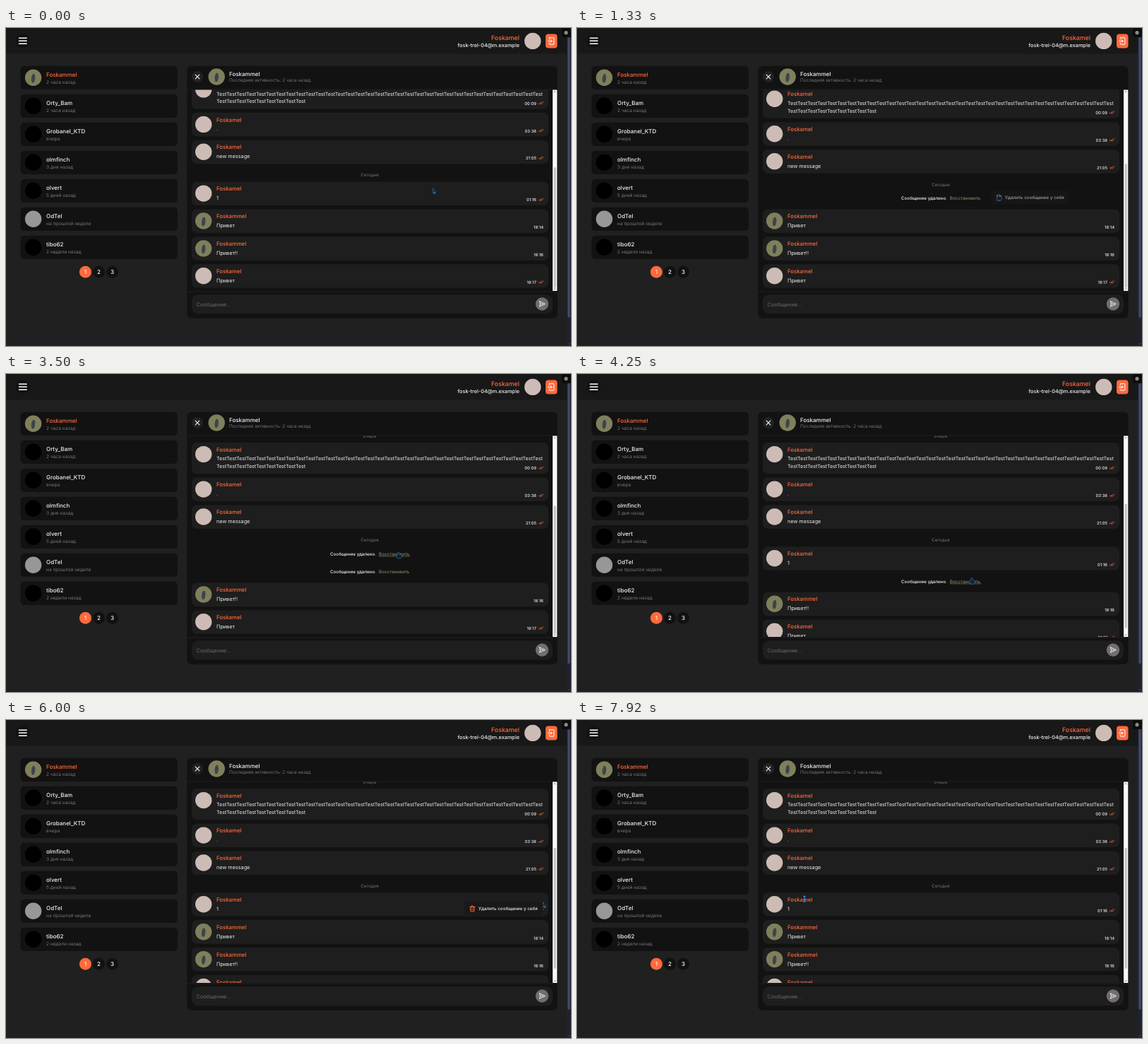
An HTML page with a canvas that plays this animation: 800x450 px, repeating every 8 s.

```html
<!DOCTYPE html>
<html lang="ru">
<head>
<meta charset="utf-8">
<style>
  html, body { margin: 0; width: 100%; height: 100%; overflow: hidden; background: #202021; }
  canvas { display: block; width: 800px; height: 450px; }
</style>
</head>
<body>
<canvas id="stage" width="800" height="450"></canvas>
<script>
const ctx = document.getElementById('stage').getContext('2d');
const LOOP = 8000, FPS = 12, TAU = Math.PI * 2;
const ORANGE = '#ff6a3d', WHITE = '#f2f2f2', GRAY = '#777', CARD = '#1e1e1e', DARK = '#121212';
const BLUE = '#3b8fdc', OLIVE = '#87856a';
const ME = 'Foskamel', FRIEND = 'Foskammel';
const CARD_H = 33.6, LINE_H = 10.6, GAP = 5.3, DATE_H = 19.9, SHRINK = 13.35;

const contacts = [
  [FRIEND, '2 часа назад', 'photo'], ['Orty_Bam', '2 часа назад'], ['Grobanel_KTD', 'вчера'],
  ['olmfinch', '3 дня назад'], ['olvert', '5 дней назад'], ['OdTel', 'на прошлой неделе', 'pale'],
  ['tibo62', '2 недели назад']
];

// `cut` and `back`: when a message is deleted and restored.
const thread = [
  { date: 'Вчера' },
  { mine: true, lines: ['Test'.repeat(33), 'Test'.repeat(9)], time: '00:09', size: 7.1 },
  { mine: true, lines: ['.'], time: '03:38' },
  { mine: true, lines: ['new message'], time: '21:05' },
  { date: 'Сегодня' },
  { mine: true, lines: ['1'], time: '01:16', cut: 1330, back: 3580 },
  { lines: ['Привет'], time: '18:14', cut: 2750, back: 4415 },
  { lines: ['Привет!!'], time: '18:16' },
  { mine: true, lines: ['Привет'], time: '18:17' }
];

// Places the pointer reaches; a stop with `close` opens a menu there.
const stops = [
  { at: 0, x: 604, y: 227 },
  { at: 420, x: 586, y: 231, close: 1290 },
  { at: 830, x: 597, y: 235 },
  { at: 2080, x: 600, y: 266, close: 2710 },
  { at: 2420, x: 610, y: 271 },
  { at: 3170, x: 556, y: 252 },
  { at: 4170, x: 559, y: 288 },
  { at: 5165, x: 713, y: 258 },
  { at: 5830, x: 760, y: 258, close: 6825 },
  { at: 6665, x: 765, y: 247 },
  { at: 7250, x: 766, y: 281 },
  { at: 7915, x: 322, y: 249 }
];
const TRAVEL = 500;
const menu = { w: 111, h: 19, delay: 100, fade: 120, maxX: 649 };

const clamp = v => Math.max(0, Math.min(1, v));
const isCut = (item, t) => t >= item.cut && t < item.back;

function box(x, y, w, h, r, color) {
  ctx.fillStyle = color;
  ctx.beginPath();
  ctx.roundRect(x, y, w, h, r);
  ctx.fill();
}

function frame(x, y, w, h, r, color, width) {
  ctx.strokeStyle = color;
  ctx.lineWidth = width;
  ctx.beginPath();
  ctx.roundRect(x, y, w, h, r);
  ctx.stroke();
}

function disc(x, y, r, color) {
  ctx.fillStyle = color;
  ctx.beginPath();
  ctx.arc(x, y, r, 0, TAU);
  ctx.fill();
}

function line(color, width, ...points) {
  ctx.strokeStyle = color;
  ctx.lineWidth = width;
  ctx.beginPath();
  points.forEach(([x, y]) => ctx.lineTo(x, y));
  ctx.stroke();
}

// A corner of two strokes around a tip, opening along (dx, dy).
function chevron(x, y, dx, dy, color, width) {
  line(color, width, [x + dx - dy, y + dy + dx], [x, y], [x + dx + dy, y + dy - dx]);
}

function text(s, x, cy, size, color = WHITE, weight = 400, align = 'left') {
  ctx.font = `${weight} ${size}px Inter, sans-serif`;
  ctx.textAlign = align;
  ctx.fillStyle = color;
  ctx.fillText(s, x, cy + size * 0.36);
}

function avatar(x, y, kind) {
  const colors = { anime: '#cdbcb5', pale: '#979797', photo: '#807f5c' };
  disc(x, y, 11.7, colors[kind] || '#000');
  if (kind !== 'photo') return;
  ctx.fillStyle = '#3e444b';
  ctx.beginPath();
  ctx.ellipse(x, y + 1, 2.7, 6.5, 0.1, 0, TAU);
  ctx.fill();
}

function ticks(x, y) {
  for (const shift of [0, 2.2]) {
    line(ORANGE, 0.75, [x + shift, y], [x + shift + 1.7, y + 1.6], [x + shift + 4.7, y - 1.8]);
  }
}

function heightOf(item, t) {
  if (item.date) return DATE_H;
  const full = CARD_H + (item.lines.length - 1) * LINE_H + GAP;
  return isCut(item, t) ? full - SHRINK : full;
}

// Every deletion moves the history above it down for good.
function layout(t) {
  const pending = thread.filter(item => item.cut > t).length;
  const shift = -SHRINK * pending;
  let top = 77.1 + shift;
  const rows = thread.map(item => {
    const row = { item, top, deleted: isCut(item, t) };
    top += heightOf(item, t);
    return row;
  });
  return { rows, shift };
}

function message({ mine, lines, time, size = 7.25 }, top) {
  const h = CARD_H + (lines.length - 1) * LINE_H;
  box(263, top, 505, h, 7, CARD);
  avatar(279.7, top + 16.6, mine ? 'anime' : 'photo');
  text(mine ? ME : FRIEND, 298, top + 9.9, 7.8, ORANGE, 500);
  lines.forEach((s, i) => text(s, 298, top + 22.9 + i * LINE_H, size));
  text(time, mine ? 751 : 761, top + h - 7.9, 5.8, WHITE, 500, 'right');
  if (mine) ticks(754, top + h - 8.2);
}

function overLink(row, p) {
  return row.deleted && p.x > 528 && p.x < 572 && Math.abs(p.y - row.top - 10.2) < 7;
}

function deletedRow(row, p) {
  const y = row.top + 10.2;
  text('Сообщение удалено.', 459, y, 6.25, WHITE, 500);
  text('Восстановить', 528, y, 6.3, OLIVE, 500);
  if (overLink(row, p)) line(OLIVE, 0.6, [528, y + 3.6], [572, y + 3.6]);
}

function conversation(t, { rows, shift }, p) {
  ctx.save();
  ctx.beginPath();
  ctx.rect(256, 87.5, 518, 284.5);
  ctx.clip();
  for (const row of rows) {
    if (row.item.date) text(row.item.date, 515, row.top + 10.6, 6.2, GRAY, 400, 'center');
    else if (row.deleted) deletedRow(row, p);
    else message(row.item, row.top);
  }
  ctx.restore();
  scrollbar(rows.filter(row => row.deleted).length, 147.8 - shift);
}

function scrollbar(cutCount, scroll) {
  const view = 284.5, track = 276, content = 459 - SHRINK * cutCount;
  box(774, 87.5, 6.3, view, 0, '#fafafa');
  box(775.3, 92 + track * scroll / content, 3.6, track * view / content, 1.8, '#c3c6cc');
  chevron(777.1, 89.6, 0, 1.2, '#666', 0.8);
  chevron(777.1, 370, 0, -1.2, '#666', 0.8);
}

function header() {
  box(0, 0, 800, 36.5, 0, '#181818');
  disc(23.8, 18.3, 10, '#121212');
  for (let i = -1; i <= 1; i++) box(17.8, 17.5 + i * 4, 12, 1.6, 0.5, '#fff');
  text(ME, 727, 13.8, 8.8, ORANGE, 500, 'right');
  text('fosk-trel-04@m.example', 727, 24, 7.3, WHITE, 500, 'right');
  avatar(745.8, 18.4, 'anime');
  box(764, 8.5, 16.5, 20, 4, ORANGE);
  frame(769.3, 13.7, 6.5, 9.5, 0.5, '#fff', 1);
  line(ORANGE, 1.6, [769.3, 16.8], [769.3, 20.2]);
  line('#fff', 1, [767.6, 18.5], [773, 18.5]);
  chevron(773.1, 18.5, -1.9, 0, '#fff', 1);
}

function pageEdge() {
  box(794, 0, 6, 450, 0, '#1f222e');
  box(795.3, 13, 3.4, 397, 1.7, '#414a68');
  chevron(797, 447.5, 0, -1, '#59617a', 0.7);
  box(787, 0, 13, 13, 2, '#0c0c0c');
  disc(793, 6.7, 2.6, '#8a8a8a');
}

function sidebar() {
  contacts.forEach(([name, seen, kind], i) => {
    const y = 53.7 + i * 40;
    box(20.5, y, 222.5, 33.3, 5.5, DARK);
    avatar(38.6, y + 16.6, kind);
    text(name, 57, y + 12.5, 8, i ? WHITE : ORANGE, 500);
    text(seen, 57, y + 22.8, 6.6, GRAY);
  });
  for (let i = 0; i < 3; i++) {
    const x = 112.4 + i * 19.1;
    disc(x, 345.3, 8.5, i ? '#111' : ORANGE);
    text(i + 1, x, 345.4, 8, '#fff', 500, 'center');
  }
}

function panel(t, chat, p) {
  box(256.3, 53.7, 524.4, 357, 6, DARK);
  disc(271, 69, 8, '#222');
  for (const s of [-1, 1]) line('#fff', 1.1, [268.2, 69 - 2.8 * s], [273.8, 69 + 2.8 * s]);
  avatar(298.2, 69, 'photo');
  text(FRIEND, 316, 65.2, 8, WHITE, 500);
  text('Последняя активность: 2 часа назад', 316, 74, 6.4, GRAY);
  box(256.3, 86.6, 518, 0.9, 0, '#1f1f1f');
  conversation(t, chat, p);
  box(256.3, 372.6, 524.4, 0.9, 0, '#202020');
  box(263, 377.3, 511, 27, 9, CARD);
  text('Сообщение...', 269.5, 390.8, 7.5, '#686868');
  disc(759, 390.5, 9.2, '#716e6d');
  line('#fff', 0.9, [755.4, 386.8], [763.4, 390.5], [755.4, 394.2], [756.5, 390.5], [755.4, 386.8]);
  line('#fff', 0.8, [756.5, 390.5], [760, 390.5]);
}

function openMenu(t) {
  const stop = stops.find(s => t >= s.at + menu.delay && t < s.close + menu.fade);
  if (!stop) return null;
  const appear = clamp((t - stop.at - menu.delay / 2) / menu.fade);
  const vanish = clamp((t - stop.close) / menu.fade);
  return { x: Math.min(stop.x, menu.maxX), y: stop.y - 0.5, alpha: appear * (1 - vanish) };
}

function drawMenu({ x, y, alpha }) {
  const cx = x + 11.3, cy = y + menu.h / 2;
  ctx.save();
  ctx.globalAlpha = alpha;
  box(x, y, menu.w, menu.h, 2, '#191919');
  frame(cx - 2.7, cy - 2.4, 5.4, 6.4, 1, ORANGE, 1);
  frame(cx - 1.3, cy - 4, 2.6, 1.5, 0.3, ORANGE, 0.8);
  line(ORANGE, 1, [cx - 3.7, cy - 2.5], [cx + 3.7, cy - 2.5]);
  for (const s of [-0.9, 0.9]) line(ORANGE, 0.7, [cx + s, cy - 0.4], [cx + s, cy + 2.2]);
  text('Удалить сообщение у себя', x + 20, cy, 6.25, WHITE, 500);
  ctx.restore();
}

function pointerAt(t) {
  const i = stops.findIndex(s => s.at > t);
  if (i < 0) return stops.at(-1);
  const a = stops[i - 1], b = stops[i];
  const begin = Math.max(a.at, b.at - TRAVEL);
  const k = clamp((t - begin) / (b.at - begin)), ease = k * k * (3 - 2 * k);
  return { x: a.x + (b.x - a.x) * ease, y: a.y + (b.y - a.y) * ease };
}

function pointerKind(p, popup, rows) {
  const inMenu = popup && p.x > popup.x + 3 && p.x < popup.x + menu.w - 3 &&
    p.y > popup.y && p.y < popup.y + menu.h;
  if (inMenu || rows.some(row => overLink(row, p))) return 'hand';
  return p.x < 340 ? 'text' : 'arrow';
}

function drawPointer({ x, y }, kind) {
  const fill = '#14202e';
  ctx.save();
  ctx.translate(x, y);
  if (kind === 'hand') {
    frame(-2.6, 3.6, 6.6, 5.2, 1.6, BLUE, 1);
    frame(-0.9, 0.5, 1.7, 5, 0.8, BLUE, 1);
    box(-2.6, 3.6, 6.6, 5.2, 1.6, fill);
    box(-0.9, 0.5, 1.7, 5, 0.8, fill);
  } else if (kind === 'text') {
    line(BLUE, 1.3, [0, 0.5], [0, 8]);
    for (const end of [0.5, 8]) line(BLUE, 1, [-1.5, end], [1.5, end]);
  } else {
    line(BLUE, 0.9, [0.6, 0.4], [0.6, 7], [2.3, 5.6], [5, 5], [0.6, 0.4]);
    ctx.fillStyle = fill;
    ctx.fill();
    line(BLUE, 1.1, [2.4, 5.7], [3.5, 7.6]);
  }
  ctx.restore();
}

function draw(t) {
  const p = pointerAt(t), popup = openMenu(t), chat = layout(t);
  ctx.lineCap = ctx.lineJoin = 'round';
  ctx.textRendering = 'geometricPrecision';
  box(0, 0, 800, 450, 0, '#202021');
  header();
  pageEdge();
  sidebar();
  panel(t, chat, p);
  if (popup) drawMenu(popup);
  drawPointer(p, pointerKind(p, popup, chat.rows));
}

const start = performance.now();
function tick() {
  const elapsed = (performance.now() - start) % LOOP;
  draw(Math.floor((elapsed + 5) * FPS / 1000) * 1000 / FPS % LOOP);
  requestAnimationFrame(tick);
}
tick();
</script>
</body>
</html>
```
